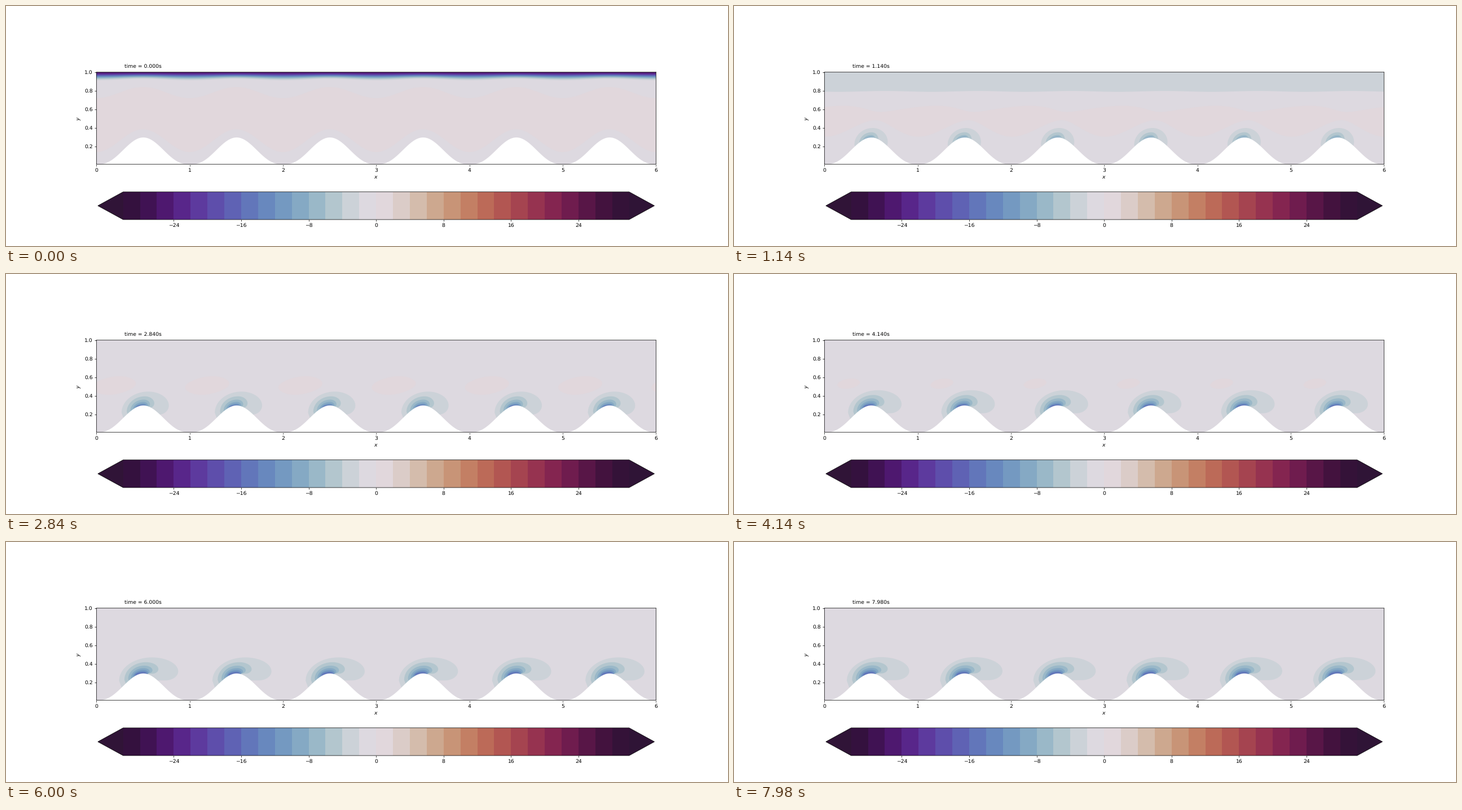
A matplotlib script for the animation above (8 s loop, 1280x427 px).

```python
import numpy as np
import matplotlib.pyplot as plt
from matplotlib.animation import FuncAnimation
from matplotlib.collections import PolyCollection
from matplotlib.patches import Polygon

W, H, DPI = 1280, 427, 64
FRAMES, STEP = 400, 20
S = 200 / 3 / DPI  # point scale
VMAX = 30
CMAP = plt.get_cmap("twilight_shifted")

plt.rcParams.update({
    "font.family": "DejaVu Sans", "font.size": 10 * S, "text.hinting": "none",
    "axes.linewidth": 0.8 * S, "axes.labelpad": 4 * S,
})
for axis in ("xtick", "ytick"):
    plt.rcParams.update({f"{axis}.major.size": 3.5 * S,
                         f"{axis}.major.width": 0.8 * S,
                         f"{axis}.major.pad": 3.5 * S})

xs = np.linspace(0, 6, 721)
hill = .01 + .29 * np.abs(np.sin(np.pi * xs)) ** 2.5
arc = np.linspace(0, np.pi / 2, 24)
COS, SIN = np.cos(arc), np.sin(arc)


def band(mid):
    return CMAP((mid + VMAX) / (2 * VMAX))


def place(left, top, right, bottom):
    return [left / W, 1 - bottom / H, (right - left) / W, (bottom - top) / H]


def wave(shift=0):
    return np.cos(2 * np.pi * (xs - shift))


def between(lo, hi):
    return np.column_stack([np.r_[xs, xs[::-1]], np.r_[lo, hi[::-1]]])


def lid_layers(t):
    """Vorticity diffusing down from the moving lid."""
    s = .0028 + .115 * t
    amp = 2.414 / np.sqrt(np.pi * s)
    base = .7
    ripple = (1 + .2 * np.exp(-6 * t) * wave()
              - .12 * min(t / 1.9, 1) ** 2 * wave(.65))
    for level in range(-2, -VMAX, -2):
        ratio = amp / (base - level)
        if ratio > 1:
            depth = np.sqrt(s * ripple * np.log(ratio))
            yield between(1 - depth, np.ones_like(xs)), band(level - 1)


def positive_zone(t):
    """Open band that breaks into tilted pockets; its edge is quadratic in y."""
    g = min(1, np.sqrt(t / .5))
    upper = .78 - .13 * g - .06 * (1 - g) * wave()
    lower = .2625 + .0875 * g - (.1225 - .0175 * g) * wave()

    # elliptic pockets, shrinking until 4.7 s
    w2 = .025 * max(4.7 - max(t, 1.9), 1e-6)
    h2 = .2 * w2
    phase = np.pi * (xs - .29 + 2.2 * w2)
    mid = .54 - .6 * w2 + .13 * np.sin(2 * phase) / (2 * np.pi)

    mix = np.clip((t - .5) / 1.4, 0, 1)
    k, e = 60 * (1 - mix), mix / h2
    a = k + e
    b = k * (upper + lower) + 2 * e * mid
    c = (mix * (1 - (np.sin(phase) / np.pi) ** 2 / w2)
         - k * upper * lower - e * mid ** 2)
    root = np.sqrt(np.maximum(b * b + 4 * a * c, 0))
    return between((b - root) / (2 * a), (b + root) / (2 * a))


def wake(n, t):
    """Outline of the n-th level above a crest, in hundredths until the end."""
    rise = 1 - np.exp(-.58 * (t - .5))
    stretch = 1 - np.exp(-.25 * (t - .5))
    m = n + 1
    ty = ((10 + 9 * rise) * (.6 + .13 * rise) ** n
          - 3.5 + 1.9 * rise - 6 * np.exp(-10 * t))
    tx = stretch * (13.7 * m ** -1.4 - .9)
    lx, ly = -7 - 1.1 * ty, min(1.05 * n - 8.2, ty)
    rx, ry = (13 + 33 * stretch) * m ** -1.2, ty - 15 / m
    bx, by = (tx + rx) / 2, ry - 9.75 / m
    x = np.r_[tx + (lx - tx) * COS, tx + (rx - tx) * SIN,
              bx + (rx - bx) * COS, 0, lx + 15, lx + 2.5]
    y = np.r_[ly + (ty - ly) * SIN, ry + (ty - ry) * COS,
              ry + (by - ry) * SIN, by, ly - 13, ly - 7]
    return np.column_stack([x, y + 30]) / 100


def shapes(t):
    items = [(positive_zone(t), band(1)), *lid_layers(t)]
    for n in range(7):
        outline = wake(n, t)
        items += [(outline + [i + .5, 0], band(-3 - 2 * n)) for i in range(6)]
    return zip(*items)


fig = plt.figure(figsize=(W / DPI, H / DPI), dpi=DPI, facecolor="white")

ax = fig.add_axes(place(160.33, 117.67, 1152.33, 281.67), facecolor=band(-1))
ax.set(xlim=(0, 6), ylim=(.008, 1), xlabel="$x$", ylabel="$y$",
       xticks=range(7), yticks=[.2, .4, .6, .8, 1])
ax.spines[:].set_snap(False)
field = PolyCollection([], linewidths=0, zorder=1)
ax.add_collection(field, autolim=False)
ax.fill_between(xs, 0, hill, color="white", linewidth=0, zorder=2.2)
clock = ax.text(.3, 1.05, "")

bar = fig.add_axes(place(162.85, 330.7, 1149.55, 380))
bar.spines[:].set_visible(False)
edges = np.arange(-VMAX, VMAX + 1, 2)
mids = (edges[:-1] + edges[1:]) / 2
bar.pcolormesh(edges, [0, 1], mids[None], cmap=CMAP, vmin=-VMAX, vmax=VMAX,
               zorder=1)
for end in (-1, 1):
    # reaches under the first cell so that no seam shows
    bar.add_patch(Polygon(np.array([(29, 0), (30, 0), (33, .5), (30, 1), (29, 1)])
                          * [end, 1], fc=band(end * VMAX), lw=0, zorder=.5))
bar.add_patch(Polygon([(-33, .5), (-30, 1), (30, 1), (33, .5), (30, 0), (-30, 0)],
                      fill=False, ec="black", lw=.8 * S, clip_on=False))
bar.set(xlim=(-33, 33), ylim=(0, 1), xticks=range(-24, 25, 8), yticks=[])


def update(i):
    t = i * STEP / 1000
    verts, colors = shapes(t)
    field.set_verts(verts)
    field.set_facecolor(colors)
    clock.set_text(f"time = {t:.3f}s")
    return field, clock


anim = FuncAnimation(fig, update, frames=FRAMES, interval=STEP, repeat=True)
plt.show()
```
